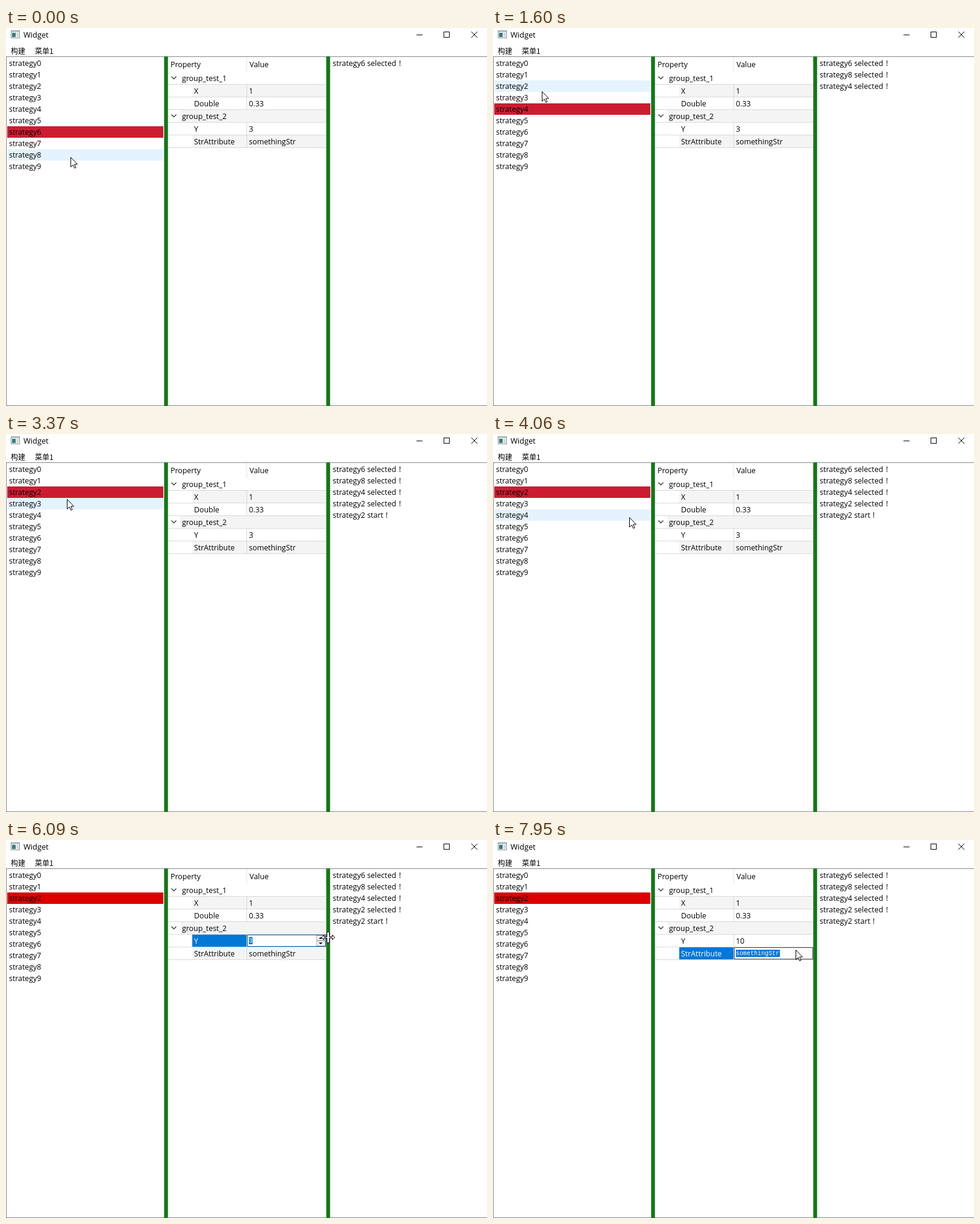
An HTML page that plays this animation: 798x627 px, repeating every 8 s.

```html
<!DOCTYPE html>
<html lang="en">
<head>
<meta charset="utf-8">
<title>Widget</title>
<style>
  html, body { margin: 0; width: 100%; height: 100%; overflow: hidden; background: #fff; }
  svg { display: block; width: 798px; height: 627px; }
  text { font: 12.4px "Open Sans", "Noto Sans CJK SC", "Noto Sans CJK", sans-serif; white-space: pre; }
  .cjk { font: 12px "Noto Sans CJK SC", "Noto Sans CJK", sans-serif; }
  .title { font-size: 12.8px; }
  .log { font-size: 12.5px; }
  .edit { font: 10px "Liberation Mono", monospace; }
</style>
</head>
<body>
<svg viewBox="0 0 798 627">
  <g id="back"></g>
  <g id="live"></g>
  <g id="pointer"></g>
</svg>
<script>
const LOOP = 8000, BLUE = '#0078d7', GRID = '#d9d9d9', EDGE = '#828790';
const $ = id => document.getElementById(id);
const rect = (x, y, w, h, fill) =>
  `<rect x="${x}" y="${y}" width="${w}" height="${h}" fill="${fill}"/>`;
const frame = (x, y, w, h, stroke, fill = 'none') =>
  `<rect x="${x + .5}" y="${y + .5}" width="${w - 1}" height="${h - 1}" fill="${fill}" stroke="${stroke}"/>`;
const label = (x, y, s, fill = '#000', cls = '') =>
  `<text x="${x}" y="${y}" fill="${fill}" class="${cls}">${s}</text>`;
const path = (d, stroke = '#000', fill = 'none', w = 1) =>
  `<path d="${d}" stroke="${stroke}" fill="${fill}" stroke-width="${w}"/>`;

// time, x, y, shape: a = arrow, i = text beam, s = splitter
const MOVES = [
  [0, 107, 214, 'a'], [150, 100, 213, 'a'], [550, 97, 198, 'a'], [680, 92, 175, 'a'],
  [810, 87, 150, 'a'], [940, 84, 135, 'a'], [1450, 83, 125, 'a'], [1600, 81, 105, 'a'],
  [2270, 81, 98, 'a'], [2860, 87, 108, 'a'], [2990, 96, 118, 'a'], [3240, 100, 112, 'a'],
  [3370, 101, 108, 'a'], [3780, 116, 112, 'a'], [3915, 162, 124, 'a'], [4050, 226, 138, 'a'],
  [4180, 298, 152, 'a'], [4315, 360, 162, 'a'], [4450, 402, 166, 'a'], [4585, 418, 163, 'a'],
  [4720, 422, 161, 'a'], [4990, 424, 164, 'i'], [5270, 424, 162, 'i'], [5570, 450, 161, 'i'],
  [5700, 490, 160, 'i'], [5830, 525, 160, 'a'], [5960, 547, 161, 'a'], [6090, 534, 161, 's'],
  [6210, 525, 160, 'a'], [7650, 520, 168, 'a'], [7800, 508, 178, 'a'], [7950, 502, 182, 'a']
];
const PICKS = [[0, 6], [420, 8], [1200, 4], [1870, 2]];
const START = 3110, EDIT_Y = 4990, EDIT_STR = 7950;
const SPINS = [6370, 6510, 6630, 6900, 7050, 7200, 7500];
const STEPS = [...new Set([...MOVES, ...PICKS].map(m => m[0]).concat(START, SPINS))]
  .sort((a, b) => a - b);

const last = (list, t) => list.filter(k => k[0] <= t).pop();

function drawBack() {
  let s = rect(0, 0, 798, 627, '#fff');
  s += frame(8, 4, 15, 13, '#8a9299', '#f4f6f7') + rect(9, 5, 13, 2, '#c3cbd1')
     + rect(10, 8, 6, 7, '#347f78') + rect(17, 8, 4, 7, '#d5dadd');
  s += label(29, 16, 'Widget', '#000', 'title');
  s += path('M681 11.5H691') + frame(726, 6, 10, 10, '#000') + path('M772 6L782 16M782 6L772 16');
  s += label(8, 43, '构建', '#000', 'cjk') + label(48, 43, '菜单1', '#000', 'cjk');
  s += path('M0 47.5H798M0 626.5H798', EDGE);
  s += rect(263, 47, 5, 580, '#008000') + rect(532, 47, 5, 580, '#008000');
  s += path('M.5 47V627M262.5 47V627M268.5 47V627M531.5 47V627M537.5 47V627', EDGE);
  s += label(273, 65, 'Property') + label(404, 65, 'Value') + path('M399.5 48V73M530.5 48V73', '#e5e5e5');
  s += rect(309, 94, 222, 20, '#f4f4f4') + rect(289, 136, 242, 20, '#f4f4f4') + rect(309, 178, 222, 20, '#f4f4f4');
  for (let y = 93; y < 200; y += 21) s += path(`M269 ${y + .5}H531`, GRID);
  s += path('M399.5 94V135M399.5 157V198', GRID);
  [[88, 1], [151, 2]].forEach(([y, n]) => {
    s += label(292, y, 'group_test_' + n)
       + path(`M274.5 ${y - 7.5}l4 4l4 -4`, '#404040', 'none', 1.5);
  });
  s += label(312, 109, 'X') + label(403, 109, '1') + label(312, 130, 'Double') + label(403, 130, '0.33');
  $('back').innerHTML = s;
}

function strategies(t, x, y) {
  const picked = last(PICKS, t)[1];
  const hover = x < 262 ? Math.floor((y - 49) / 19) : -1;
  let s = '';
  for (let i = 0; i < 10; i++) {
    const top = 49 + 19 * i;
    if (i === picked) s += rect(2, top, 259, 19, t < EDIT_Y ? '#cd1c31' : '#dc0000');
    else if (i === hover) s += rect(2, top, 259, 19, '#e5f3ff');
    s += label(5, top + 14, 'strategy' + i);
  }
  return s;
}

function log(t) {
  const lines = PICKS.filter(p => p[0] <= t).map(p => [`strategy${p[1]} selected`, 652]);
  if (t >= START) lines.push(['strategy2 start', 630]);
  return lines.map(([s, x], i) =>
    label(542, 63 + 19 * i, s, '#000', 'log') + label(x, 63 + 19 * i, '!')).join('');
}

const marked = (y, s) =>
  rect(403, y, 6 * s.length + (s.length > 2 ? 1 : 0), 12, BLUE) + label(403, y + 9, s, '#fff', 'edit');

function spinBox(n) {
  return frame(400, 157, 131, 20, '#005a9e', '#fff') + marked(161, n)
    + frame(515, 158, 15, 9, '#b5b5b5', '#f0f0f0') + frame(515, 167, 15, 9, '#b5b5b5', '#f0f0f0')
    + '<path d="M519 164h6l-3 -3zM519 170h6l-3 3z"/>';
}

function properties(t) {
  const n = String(3 + SPINS.filter(k => k <= t).length);
  const onY = t >= EDIT_Y && t < EDIT_STR, onStr = t >= EDIT_STR;
  let s = '';
  if (onY) s += rect(309, 157, 90, 20, BLUE) + spinBox(n);
  else s += label(403, 172, n);
  s += label(312, 172, 'Y', onY ? '#fff' : '#000');
  if (onStr) s += rect(309, 178, 90, 20, BLUE) + frame(400, 178, 131, 20, '#444', '#fff') + marked(182, 'somethingStr');
  else s += label(403, 193, 'somethingStr');
  return s + label(312, 193, 'StrAttribute', onStr ? '#fff' : '#000');
}

const SHAPES = {
  a: path('M.5 .5V16.5L4.2 13L6.7 18.5L9 17.5L6.6 12H11.5Z', '#000', '#fff'),
  i: path('M-3 -7.5H-1L.5 -6.5L2 -7.5H4M.5 -6.5V7.5M-3 8.5H-1L.5 7.5L2 8.5H4'),
  s: path('M-10.5 .5L-6.5 -3.5V-.5H-1.5V-8.5H2.5V-.5H7.5V-3.5L11.5 .5L7.5 4.5V1.5H2.5V9.5H-1.5V1.5H-6.5V4.5Z', '#000', '#fff')
};

let shown = -1;
function tick() {
  const now = performance.now() % LOOP;
  const t = STEPS.filter(k => k <= now).pop();
  if (t !== shown) {
    shown = t;
    const [, x, y, shape] = last(MOVES, t);
    $('live').innerHTML = strategies(t, x, y) + log(t) + properties(t);
    $('pointer').innerHTML = `<g transform="translate(${x} ${y})">${SHAPES[shape]}</g>`;
  }
  requestAnimationFrame(tick);
}
drawBack();
tick();
</script>
</body>
</html>
```
